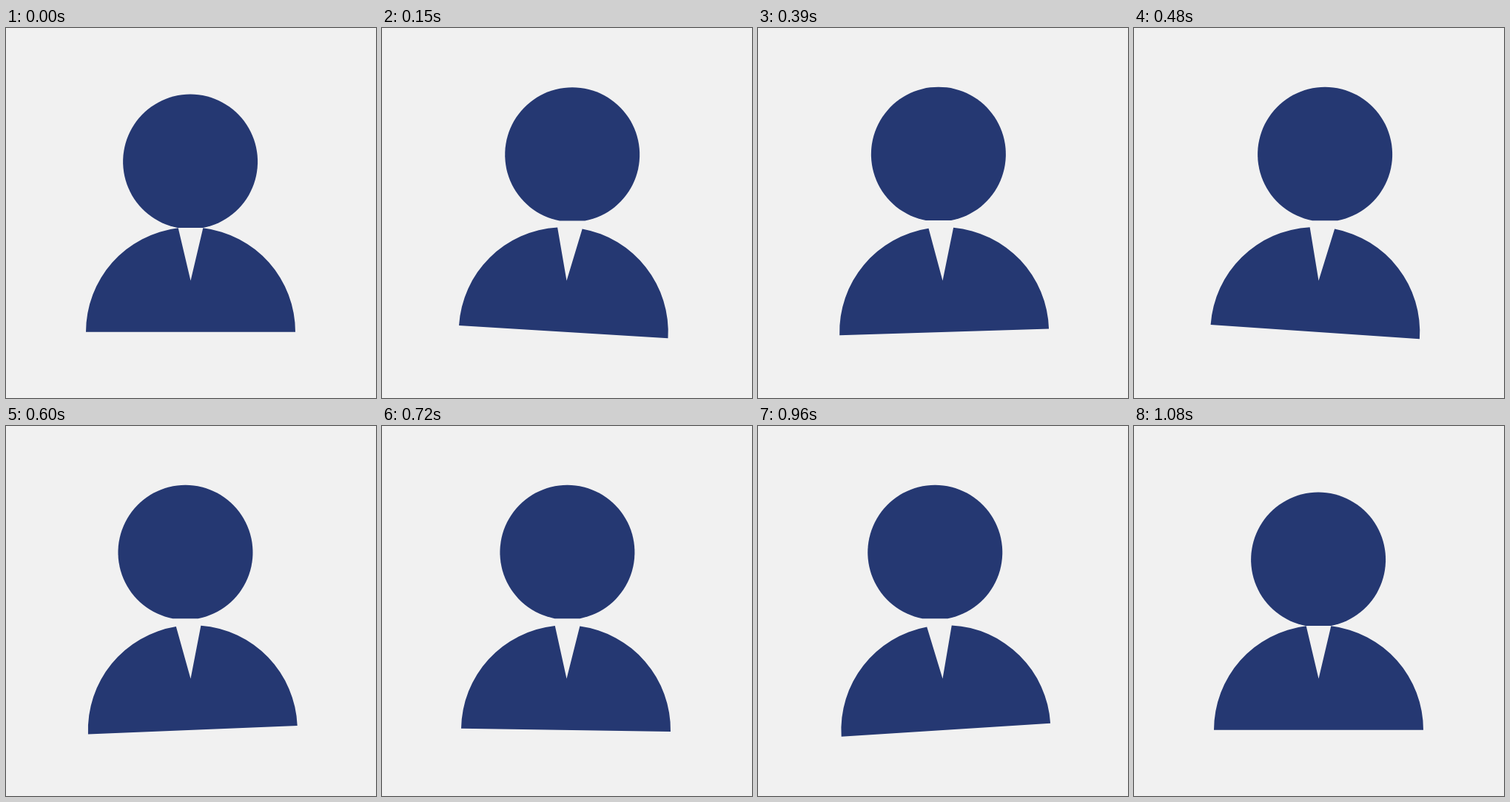
These frames come from a looping animation (500 by 500 pixels, 1.86 s). An HTML page:

```html
<!DOCTYPE html>
<html lang="en">
<head>
<meta charset="utf-8">
<title>Person icon</title>
<style>
  html, body { margin: 0; width: 100%; height: 100%; overflow: hidden; background: #f1f1f1; }
  svg { display: block; width: 100%; height: 100%; fill: #253872; }
</style>
</head>
<body>
<svg viewBox="0 0 500 500">
  <path id="body" d="M108 410.8A141.5 141.5 0 0 1 232.7 270.3L249.5 341.5L266.3 270.3A141.5 141.5 0 0 1 391 410.8Z"/>
  <path id="head" d="M232 270A91 91 0 1 1 266.2 270Z"/>
</svg>
<script>
const STEP = 30, LOOP = 1860, LAST = 36;
const SWING_IN = 6.25, SWING_OUT = 31.25;
// Tilt in degrees at five even points of a ten-step swing
const TILTS = [-2.33, -3.6, 0.85, 3.92, 2.03];
const body = document.getElementById('body');
const head = document.getElementById('head');

const ease = u => u * u * (3 - 2 * u);

// Smooth periodic curve through TILTS
function swing(k) {
  return TILTS.reduce((sum, tilt, i) => {
    const a = (k - 2 * i) * Math.PI / 5;
    return sum + tilt * (1 + 2 * Math.cos(a) + 2 * Math.cos(2 * a)) / 5;
  }, 0);
}

function pose(k) {
  const mid = Math.min(SWING_OUT, Math.max(SWING_IN, k));
  const amount = k < SWING_IN ? ease(k / SWING_IN)
    : k > SWING_OUT ? ease((LAST - k) / (LAST - SWING_OUT)) : 1;
  const tilt = swing(mid) * amount;
  const lift = (9.8 + 0.7 * Math.min(1, ((k - 19) / 9) ** 4)) * amount;
  return { tilt, lift, shift: 2.5 * tilt - 0.8 * amount };
}

function draw(now) {
  const k = Math.min(LAST, Math.floor((now % LOOP) / STEP));
  const { tilt, lift, shift } = pose(k);
  body.setAttribute('transform', `rotate(${tilt} 249.5 341.5)`);
  head.setAttribute('transform', `translate(${shift} ${-lift})`);
}

const start = performance.now();
function tick() {
  draw(performance.now() - start);
  requestAnimationFrame(tick);
}
tick();
</script>
</body>
</html>
```
